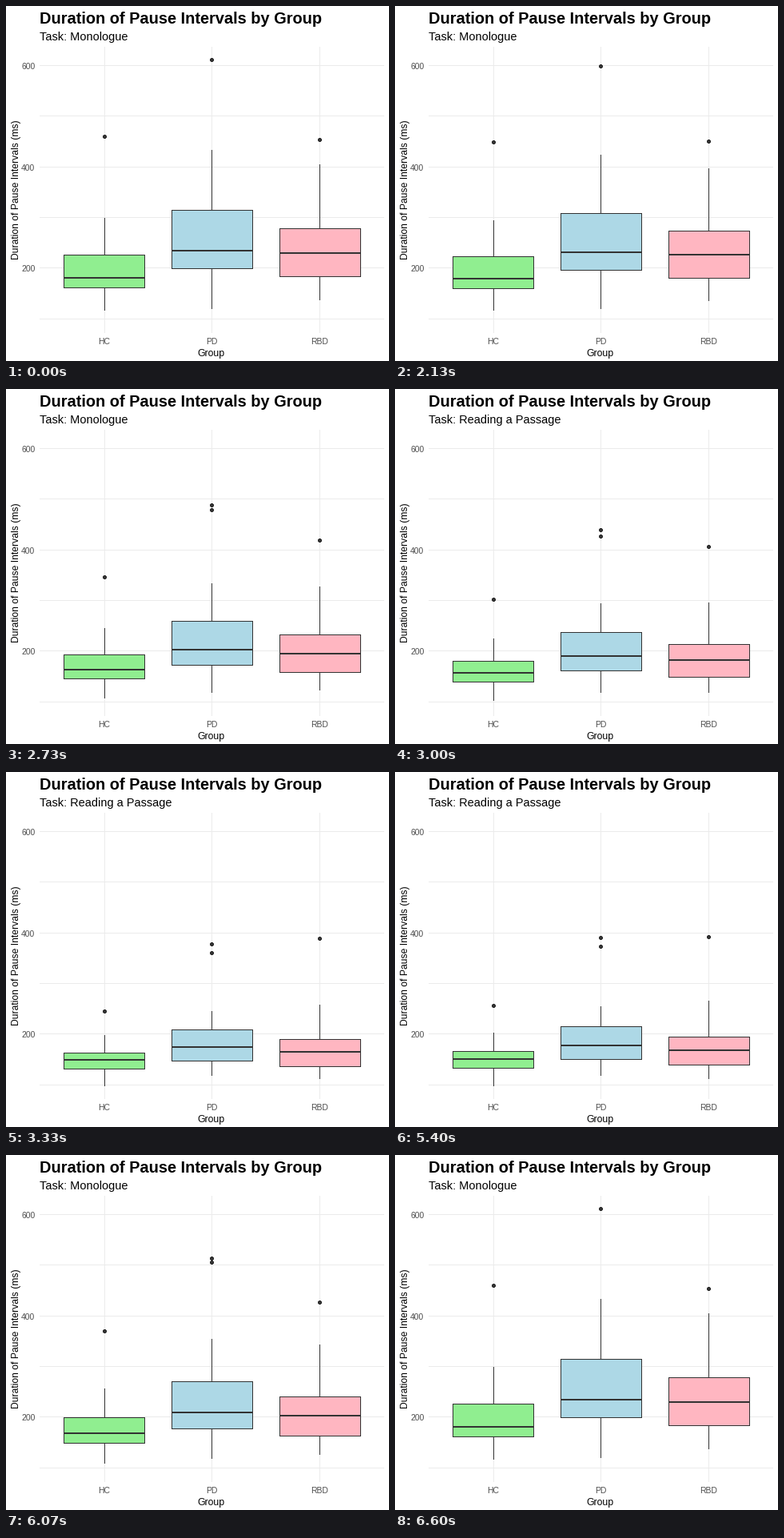
These frames come from a looping animation (479 px wide and 444 px high, 6670 ms). A matplotlib script:

```python
import matplotlib.pyplot as plt
from matplotlib.animation import FuncAnimation
from matplotlib.patches import Circle, Rectangle

W, H, DPI = 479, 444, 64
TICK_MS, TICKS = 23, 290    # 6670 ms in all
STEP_MS, STEPS = 66.7, 19   # pace and length of one transition
LEAD_MS = 26                # a step shows no later than its nominal start
INK, GRID, GREY = "#333333", "#EBEBEB", "#4D4D4D"

# Pixel rows: whisker top, box top, median, box bottom, whisker bottom
GROUPS = [
    dict(name="HC", x=123, left=72, fill="#90EE90",
         mono=(265, 311, 340, 352, 379.5), read=(329, 351, 360, 371, 392.4),
         dots=[(163, 299)]),
    dict(name="PD", x=257, left=207, fill="#ADD8E6",
         mono=(180, 255, 306, 328, 378.4), read=(299, 322, 344, 361, 379.4),
         dots=[(67, 215), (67, 226)]),
    dict(name="RBD", x=392, left=342, fill="#FFB6C1",
         mono=(198, 278, 309, 338, 367.4), read=(291, 334, 350, 368, 383.4),
         dots=[(167, 208)]),
]
BOX_W = 102

fig = plt.figure(figsize=(W / DPI, H / DPI), dpi=DPI, facecolor="white")
ax = fig.add_axes([0, 0, 1, 1])
ax.set_xlim(0, W)
ax.set_ylim(H, 0)
ax.axis("off")


def rect(x, y, w, h, color, z):
    patch = Rectangle((x, y), w, h, fc=color, lw=0, antialiased=False, zorder=z)
    return ax.add_patch(patch)


def dot(x):
    patch = Circle((x + 0.5, 0), 2.1, fc=INK, lw=0, antialiased=False, zorder=6)
    return ax.add_patch(patch)


def label(x, y, text, px, color="black", **kw):
    return ax.text(x, y, text, fontsize=px * 72 / DPI, color=color,
                   family="Liberation Sans", va="baseline", **kw)


def mix(a, b, t):
    return round(a + (b - a) * t)


def span(patch, first, last):
    patch.set_y(first)
    patch.set_height(last - first + 1)


class Box:
    """One box plot whose parts sit on whole pixels."""

    def __init__(self, g):
        self.g = g
        left, x = g["left"], g["x"]
        self.stem = rect(x, 0, 1, 1, INK, 2)
        self.frame = rect(left, 0, BOX_W, 1, INK, 3)
        self.body = rect(left + 1, 0, BOX_W - 2, 1, g["fill"], 4)
        self.mid = rect(left, 0, BOX_W, 2, INK, 5)
        self.dots = [dot(x) for _ in g["dots"]]

    def place(self, t):
        g = self.g
        top, q3, med, q1, low = (mix(a, b, t) for a, b in zip(g["mono"], g["read"]))
        span(self.stem, top, low)
        span(self.frame, q3, q1)
        span(self.body, q3 + 1, q1 - 1)
        span(self.mid, med - 1, med)
        for patch, (a, b) in zip(self.dots, g["dots"]):
            patch.center = (g["x"] + 0.5, mix(a, b, t) + 0.5)


for k in range(6):
    rect(42, int(74.5 + 63.3 * k), 431, 1, GRID, 1)
for g in GROUPS:
    rect(g["x"], 51, 1, 358, GRID, 1)
    label(g["x"], 423, g["name"], 10.4, GREY, ha="center")
for value, y in ((600, 79), (400, 206), (200, 332)):
    label(36.5, y, str(value), 10.4, GREY, ha="right")

label(42.2, 22, "Duration of Pause Intervals by Group", 19.95, weight="bold")
subtitle = label(42.5, 43, "", 14.5)
label(256.5, 438, "Group", 12.2, ha="center")
label(16, 229.5, "Duration of Pause Intervals (ms)", 12.15,
      rotation=90, ha="center", rotation_mode="anchor")

boxes = [Box(g) for g in GROUPS]


def progress(step):
    """0 for the monologue, 1 for the reading, linear in between."""
    there = (step - 31) / STEPS
    back = 1 - (step - 80) / STEPS
    return max(0, min(there, back, 1))


def update(i):
    step = int((i * TICK_MS + LEAD_MS) / STEP_MS)
    t = progress(step)
    for box in boxes:
        box.place(t)
    reading = 42 <= step <= 90
    subtitle.set_text("Task: Reading a Passage" if reading else "Task: Monologue")
    return []


anim = FuncAnimation(fig, update, frames=TICKS, interval=TICK_MS,
                     repeat=True, repeat_delay=0, blit=False)
plt.show()
```
